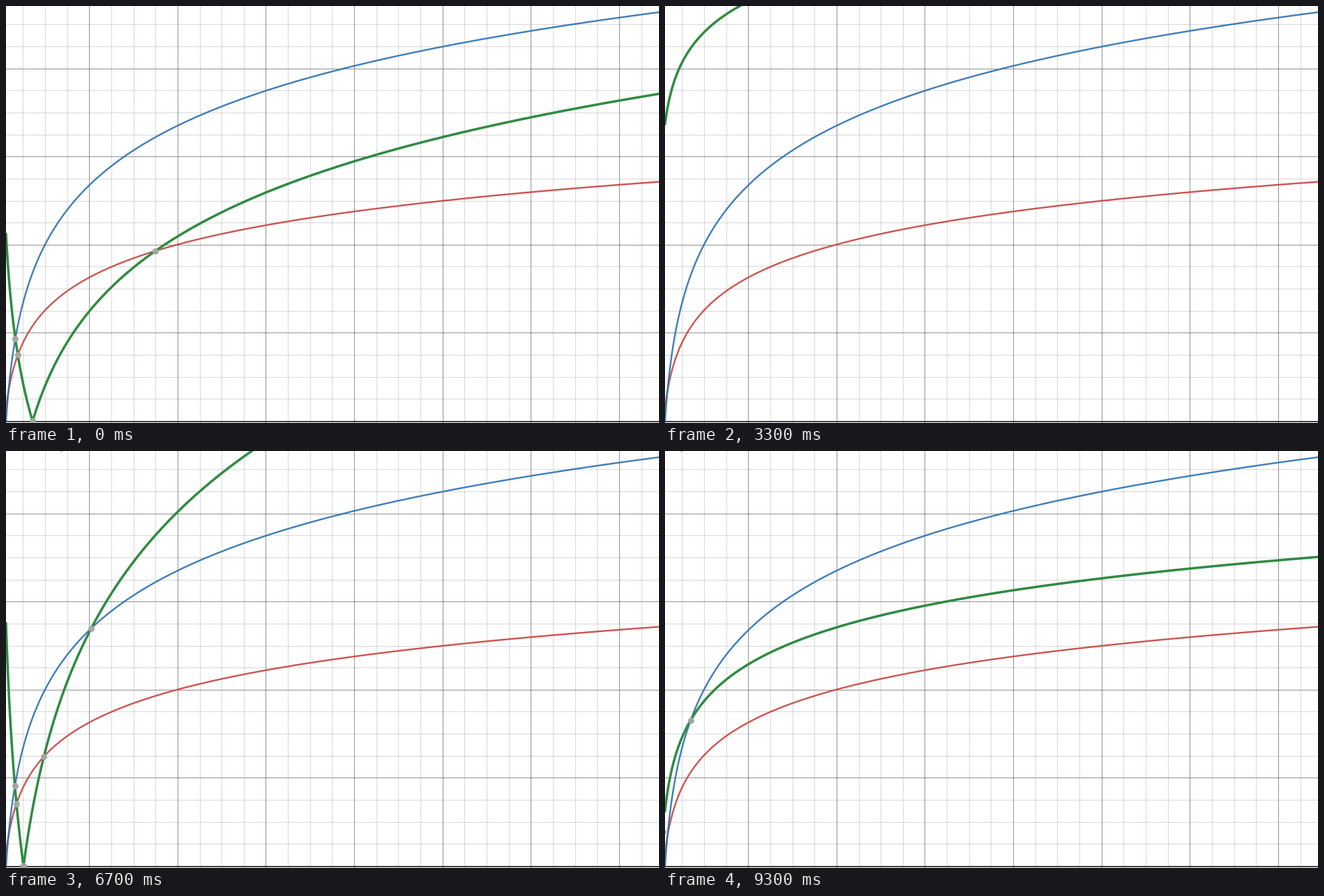
These frames come from a looping animation (936x599 px, 9.4 s). A matplotlib script:

```python
import numpy as np
import matplotlib.pyplot as plt
from matplotlib.animation import FuncAnimation

W, H, DPI = 936, 599, 100
PX = 72 / DPI                 # points per pixel
X0, Y0 = -8.3, 596.5          # plot origin in pixels
CELL = 126.6                  # pixels per major grid cell
STEP_MS, FRAMES = 100, 94

# Static curves |a + b ln u|, with u in major cells
RED = (1.627, 0.5425)
BLUE = (2.67, 0.981)

# The green curve is set by its values at x = 1 and x = 100 (20 per cell)
LOW_T = [0, 1500, 2250, 3760, 4700, 5000, 5700, 6340, 7747, 9300]
LOW_V = [-2.457, 1.416, 3.235, 3.235, 0.854, 0.133, -1.669, -3.29, -3.29, 0.462]
HIGH_T = [0, 2250, 2400, 2700, 2800, 3300, 3760, 6340, 6700, 7747]
HIGH_V = [3.222, 3.222, 3.645, 3.645, 4.35, 5.577, 6.746, 6.746, 5.826, 3.266]

LOG_U = np.linspace(np.log(1e-3), np.log(7.7), 2500)


def to_px(log_u, value):
    return X0 + CELL * np.exp(log_u), Y0 - CELL * np.abs(value)


def curve(a, b):
    return to_px(LOG_U, a + b * LOG_U)


def green_coeffs(ms):
    low = np.interp(ms, LOW_T, LOW_V)
    high = np.interp(ms, HIGH_T, HIGH_V)
    b = (high - low) / np.log(100)
    return low + b * np.log(20), b


def crossings(a, b):
    """Zero of the green curve and its meetings with the other two."""
    spots = []
    for p, q in ((0, 0), RED, BLUE):
        for sign in (1, -1):
            gap = sign * q - b
            if abs(gap) > 1e-6:
                log_u = np.clip((a - sign * p) / gap, -10, 10)
                spots.append(to_px(log_u, a + b * log_u))
    return np.array(spots).reshape(-1, 2).T


fig = plt.figure(figsize=((W + 0.01) / DPI, (H + 0.01) / DPI), dpi=DPI,
                 facecolor="white")
ax = fig.add_axes([0, 0, 1, 1])
ax.set_xlim(0, W)
ax.set_ylim(H, 0)
ax.axis("off")

for k in range(1, 30):
    major = k % 4 == 0
    style = dict(color="black", alpha=0.42 if major else 0.15, lw=PX,
                 zorder=1.5 if major else 1)
    ax.axvline(round(X0 + k * CELL / 4) + 0.5, **style)
    if k < 19:
        ax.axhline(np.floor(Y0 - k * CELL / 4) + 0.5, **style)
ax.axhline(597, color="black", lw=1.5 * PX, zorder=2)

ax.plot(*curve(*RED), color="#c74440", alpha=0.9, lw=2.4 * PX, zorder=3)
ax.plot(*curve(*BLUE), color="#2d70b3", alpha=0.9, lw=2.4 * PX, zorder=4)
green, = ax.plot([], [], color="#2f8b42", lw=3.5 * PX, zorder=5,
                 solid_joinstyle="round")
dots, = ax.plot([], [], "o", color="#a3a8a3", ms=9 * PX, mew=0, zorder=6)
pointer, = ax.plot([], [], color="#777777", lw=1.2 * PX, zorder=7)


def draw(i):
    ms = i * STEP_MS
    a, b = green_coeffs(ms)
    green.set_data(*curve(a, b))
    dots.set_data(*crossings(a, b))
    tip = np.interp(ms, [8700, 9300], [79, 23])
    pointer.set_data([tip - 3, tip + 1], [-1.5, 0.5])
    pointer.set_visible(ms >= 6300)
    return green, dots, pointer


anim = FuncAnimation(fig, draw, frames=FRAMES, interval=STEP_MS,
                     repeat=True, repeat_delay=0, blit=False)
plt.show()
```
